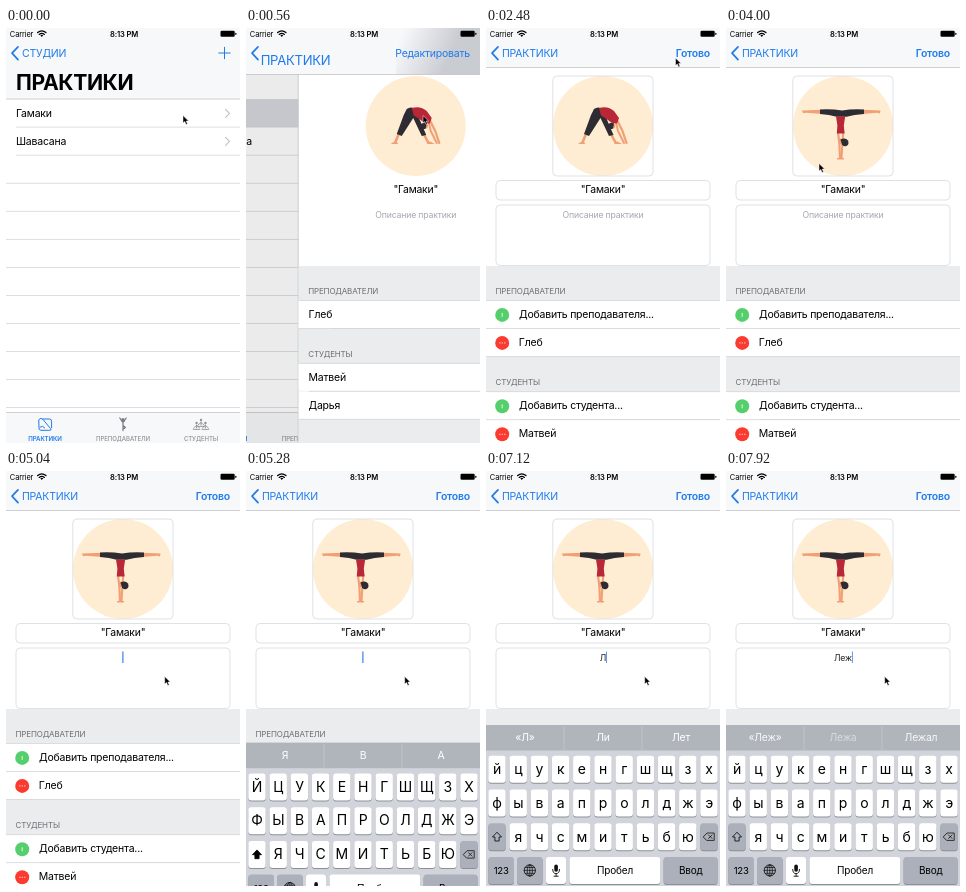
These frames come from a looping animation (234x415 px, 8000 ms). An HTML page:

```html
<!DOCTYPE html>
<html lang="ru">
<head>
<meta charset="utf-8">
<title>Практики</title>
<style>
html, body { margin: 0; width: 100%; height: 100%; overflow: hidden; background: #fff; }
svg { display: block; width: 100%; height: 100%; }
text { font-family: Inter, Roboto, "Open Sans", sans-serif; letter-spacing: -.02em; white-space: pre; }
</style>
</head>
<body>
<svg id="stage" viewBox="0 0 234 415"></svg>
<script>
const BLUE = '#1f7bea', GREY = '#929296', LINE = '#d0d1d4', SKIN = '#f0a074', DARK = '#2e2c33', RED = '#b92636';
const SOFT = '#abb0ba';

// Markup helpers
const text = (x, y, size, str, o = {}) =>
  `<text x="${x}" y="${y}" font-size="${size}" fill="${o.fill || '#000'}" font-weight="${o.weight || 400}"
    text-anchor="${o.anchor || 'start'}" ${o.id ? `id="${o.id}"` : ''} ${o.cls ? `class="${o.cls}"` : ''}>${str}</text>`;
const rect = (x, y, w, h, fill, extra = '') =>
  `<rect x="${x}" y="${y}" width="${w}" height="${h}" fill="${fill}" ${extra}/>`;
const path = (d, fill, extra = '') => `<path d="${d}" fill="${fill}" ${extra}/>`;
const stroke = (d, color, w, extra = '') =>
  `<path d="${d}" fill="none" stroke="${color}" stroke-width="${w}" stroke-linecap="round" stroke-linejoin="round" ${extra}/>`;
const line = (x, y, color = LINE) => rect(x, y - .3, 234 - x, .7, color);
const group = (id, body) => `<g id="${id}">${body}</g>`;
const mid = { anchor: 'middle' };

function listPage() {
  let s = rect(0, 0, 234, 415, '#fff') + rect(0, 71, 234, 28, '#d6d8de', 'id="pressed"');
  for (let i = 1; i < 12; i++) s += line(i < 3 ? 10 : 0, 71 + i * 28.05);
  ['Гамаки', 'Шавасана'].forEach((name, i) => {
    const y = 85.3 + i * 28;
    s += text(10, y + 3.8, 10.5, name) + stroke(`M219.6 ${y - 3.8}l3.9 3.9-3.9 3.9`, '#c4c4c9', 1.2);
  });
  return s + tabBar() + rect(0, 0, 234, 415, '#000', 'id="dim"');
}

function tabBar() {
  const tab = (x, name, fill, weight) => text(x, 412.6, 6.1, name, { anchor: 'middle', fill, weight });
  const sitter = (x, y) => `<circle cx="${x}" cy="${y}" r="1.2" fill="${GREY}"/>` +
    stroke(`M${x} ${y + 2}v3M${x - 3} ${y + 5}l3-2.6 3 2.6M${x - 3.3} ${y + 6.4}h6.6`, GREY, .9);
  return rect(0, 384.5, 234, 31, '#f7f8fa') + line(0, 384.6, '#bfbfc4') +
    stroke('M33 391.5q2-2.6 4 0l7.5 9q1.4 1.8-.6 1.8h-9q-2.4 0-2-2.8zM37 391h6.4q2.2 0 2.2 2.2v6.6M34 399q3-2 4.8 1', BLUE, 1) +
    '<circle cx="117" cy="391.6" r="1.5" fill="#77777c"/>' +
    stroke('M113.8 390l2.4 3.6h1.6l2.4-3.6M117 394v8.6M117 397.5l2.4 2-2.2 1.6', '#77777c', 1.2) +
    sitter(195, 392) + sitter(190.6, 395) + sitter(199.4, 395) +
    tab(39, 'ПРАКТИКИ', BLUE, 600) + tab(117, 'ПРЕПОДАВАТЕЛИ', GREY, 500) + tab(195, 'СТУДЕНТЫ', GREY, 500);
}

const bend = () =>
  stroke('M100 106l-3.5 8.5M125 106l4.5 8.5', SKIN, 2.6) +
  path('M92 116q2-2.5 5.500-2.500l2 2.500zM128 116q1-2.500 3.500-2.500l4.500 2.500z', SKIN) +
  path('M108 81q4-3 9 0l2 6 8.500 20-4.500 1-8.500-18-11.500 18-5-2 7-19z', DARK) +
  stroke('M131 92l5.500 11 4 12', SKIN, 2.300) + stroke('M130 94l2 9 6 12', SKIN, 2) +
  path('M113 80q9-2.500 15 3l5 7-2 5.500q-5 .5-9-3.500l-7-4.500z', RED) +
  '<circle cx="126.500" cy="98" r="2.800" fill="#f0a074"/>' +
  path('M121.500 97.500q2-4 6.500-2l-1 5q-4 2-5.500-3z', DARK);

const handstand = () =>
  path('M76 82.500l21-.8v4.300l-17-1.300-3 .5zM154.500 82.500l-18-.8v4.300l14.500-1.300 3 .8z', SKIN) +
  path('M94 81.400q12-.6 22 1 10-1.600 22-1v4.700q-10 .4-17.500 2.700h-10q-7-2.100-16.500-2.700z', DARK) +
  stroke('M112 104l1.400 12 .6 14', SKIN, 2.200) + stroke('M117.300 104l-1 13-.8 13', SKIN, 2.100) +
  path('M110 88.500h9.200l-1.400 9 .8 8h-7.800l.6-8z', RED) +
  path('M111 130h7.200l-.5 1.500h-6.700z', SKIN) +
  '<circle cx="115.600" cy="113.500" r="2.900" fill="#f0a074"/>' +
  path('M114.500 111.500q5-2.500 7.500 1 1.500 4-1.500 5.500-3.500 1-4.500-1.500z', DARK);

function row(y, name) {
  return rect(0, y, 234, 28, '#fff') + line(0, y) + line(0, y + 28) +
    `<g class="badge"><circle cx="16.200" cy="${y + 14.600}" r="7" fill="#fb3b30"/>` +
    stroke(`M13.500 ${y + 14.600}h.6M16 ${y + 14.600}h.6M18.500 ${y + 14.600}h.6`, '#ffd9d6', .9) + '</g>' +
    `<g class="inset">${text(9.800, y + 17.700, 10.5, name)}</g>`;
}

const addRow = (y, name) =>
  rect(0, y, 234, 28, '#fff') + line(0, y) + line(33, y + 28) +
  `<circle cx="16.200" cy="${y + 14.600}" r="7" fill="#55cf6b"/>` +
  stroke(`M16.200 ${y + 13}v3.200`, '#dff7e3', 1) + text(33, y + 17.700, 10.5, name);

function detailPage() {
  const head = (y, name) => text(9.500, y, 8, name, { fill: '#6d6d72' });
  const box = (x, y, w, h) => rect(x, y, w, h, 'none', 'rx="4" stroke="#d9dadd" stroke-width=".8"');
  return rect(-1, 39, 1, 376, '#c3c4c8') + rect(0, 39, 234, 376, '#fff') +
    '<circle cx="117" cy="98" r="50" fill="#ffedd3"/>' +
    group('poseA', bend()) + group('poseB', handstand()) +
    group('boxes', box(66.800, 48, 100.200, 100) + box(10, 152.500, 214, 19.500) + box(10, 177, 214, 60.500)) +
    text(117, 165, 10.400, '"Гамаки"', mid) +
    text(117, 190.200, 8.7, 'Описание практики', { id: 'hint', anchor: 'middle', fill: '#a6a7b0' }) +
    text(117, 190.200, 8.7, '', { id: 'typed', anchor: 'middle', fill: '#222' }) +
    rect(116.300, 180.500, 1.2, 11.5, '#3f7fe6', 'id="caret"') +
    rect(0, 238, 234, 177, '#ebeced') + head(266.200, 'ПРЕПОДАВАТЕЛИ') +
    addRow(272.300, 'Добавить преподавателя...') + group('teachers', row(272.300, 'Глеб')) +
    group('students', head(328.900, 'СТУДЕНТЫ') + addRow(335.200, 'Добавить студента...') +
      group('pupils', row(335.200, 'Матвей') + row(363.200, 'Дарья') + rect(0, 362.700, 10, 1, '#fff')));
}

function navBar() {
  return rect(0, 0, 234, 71, '#f7f8fa', 'id="bar"') +
    rect(150, 0, 84, 47, 'url(#shade)', 'id="haze"') +
    group('barLine', line(0, 0, '#bdbdc2')) +
    stroke('M12 18.800l-6 6.400 6 6.400', BLUE, 1.7) +
    text(16, 29, 10.5, 'СТУДИИ', { id: 'oldBack', fill: BLUE }) +
    stroke('M212.800 25h11.400M218.500 19.300v11.400', BLUE, 1, 'id="plus"') +
    text(10, 62, 21.200, 'ПРАКТИКИ', { id: 'title', weight: 700 }) +
    text(16, 29, 10.5, 'ПРАКТИКИ', { id: 'back', fill: BLUE }) +
    text(224, 29, 10.5, 'Редактировать', { id: 'edit', anchor: 'end', fill: BLUE }) +
    text(224, 29, 10.5, 'Готово', { id: 'done', anchor: 'end', fill: BLUE, weight: 600 });
}

function keyboard() {
  const key = (x, y, w, fill = '#fff', extra = '') =>
    rect(x, y + 1, w, 27, '#8d9096', 'rx="3"') + rect(x, y, w, 27, fill, `rx="3" ${extra}`);
  const col = i => 11 + 21.200 * i, top = r => 284.800 + 33.700 * r;
  let s = rect(0, 254, 234, 162, '#d1d4da') + rect(0, 254, 234, 25.500, '#b0b4bb') +
    rect(77.600, 255, .8, 24, '#c6c9ce') + rect(155.600, 255, .8, 24, '#c6c9ce');
  for (let i = 0; i < 3; i++)
    s += text(39 + 78 * i, 270.200, 10.4, '', { id: 'word' + i, anchor: 'middle', fill: '#fff' });
  ['йцукенгшщзх', 'фывапролджэ', 'ячсмитьбю'].forEach((chars, r) => [...chars].forEach((c, i) => {
    const x = col(i + (r === 2));
    s += key(x - 8.700, top(r), 17.400) + text(x, top(r) + 18.300, 14, c, { anchor: 'middle', cls: 'letter' });
  }));
  const y3 = top(2), y4 = top(3), cy = y4 + 13.500;
  s += key(2.300, y3, 17.400, '#fff', 'id="shiftKey"') +
    path(`M11 ${y3 + 9}l4.500 4.800h-2.400v4h-4.200v-4h-2.400z`, '#000', 'id="shift" stroke="#000" stroke-width=".8" stroke-linejoin="round"') +
    key(col(10) - 8.700, y3, 17.400, SOFT) +
    stroke(`M217.500 ${y3 + 13.500}l3.500-3.700h7.200v7.400h-7.200zM222.600 ${y3 + 11.800}l3.400 3.400m0-3.400l-3.400 3.400`, '#222', .9) +
    key(2.300, y4, 25.700, SOFT) + text(15.200, cy + 3.500, 9.6, '123', mid) +
    key(31, y4, 25.700, SOFT) +
    `<circle cx="43.800" cy="${cy}" r="5.600" fill="none" stroke="#111" stroke-width=".9"/>` +
    `<ellipse cx="43.800" cy="${cy}" rx="2.600" ry="5.600" fill="none" stroke="#111" stroke-width=".8"/>` +
    stroke(`M38.200 ${cy}h11.200M39.200 ${cy - 2.900}h9.200M39.200 ${cy + 2.900}h9.200M43.800 ${cy - 5.600}v11.200`, '#111', .7) +
    key(60, y4, 20) + rect(68.300, cy - 6, 3.600, 7.400, '#111', 'rx="1.800"') +
    stroke(`M66.700 ${cy - 1}q0 4.200 3.400 4.200t3.400-4.200M70.100 ${cy + 3.200}v2.600M68 ${cy + 5.800}h4.200`, '#111', .9) +
    key(83.500, y4, 90.700) + text(129, cy + 3.500, 10, 'Пробел', mid) +
    key(177.600, y4, 54, SOFT) + text(204.800, cy + 3.500, 10, 'Ввод', mid);
  return s;
}

const statusBar = () =>
  text(3.800, 8.500, 7.5, 'Carrier') +
  stroke('M31.600 4.600q4.200-3.400 8.400 0M33.200 6.400q2.600-2 5.200 0', '#000', 1.3) +
  path('M35.800 9l-1.500-1.700q1.500-1 3 0z', '#000') +
  text(118, 8.500, 7.6, '8:13 PM', { anchor: 'middle', weight: 600 }) +
  rect(214.500, 2.800, 14.200, 6, '#000', 'rx="1.300"') + rect(229.300, 4.800, 1, 2.200, '#000', 'rx=".4"');

const stage = document.getElementById('stage');
stage.innerHTML =
  `<defs><linearGradient id="shade" x2="1" y2=".25"><stop offset=".1" stop-color="#a9adb5" stop-opacity="0"/>
    <stop offset=".75" stop-color="#a9adb5" stop-opacity=".85"/></linearGradient></defs>` +
  group('list', listPage()) + group('detail', detailPage()) + group('nav', navBar()) +
  group('keys', keyboard()) + statusBar() +
  group('pointer', path('M0 0v7.600l1.800-1.600 1.300 3 1.400-.6-1.300-2.900h2.400z', '#000', 'stroke="#fff" stroke-width=".5"'));

// Motion
const $ = id => document.getElementById(id);
const letters = [...document.querySelectorAll('.letter')];
const badges = document.querySelectorAll('.badge'), insets = document.querySelectorAll('.inset');
const clamp = v => Math.max(0, Math.min(1, v));
const span = (t, from, len) => clamp((t - from) / len);
const out = u => 1 - Math.pow(1 - u, 2.4);
const inOut = u => u * u * (3 - 2 * u);
const mix = (a, b, p) => a + (b - a) * p;
const move = (el, x, y) => el.setAttribute('transform', `translate(${x} ${y})`);
const fade = (id, v) => $(id).setAttribute('opacity', clamp(v));
const set = (id, attrs) => { for (const k in attrs) $(id).setAttribute(k, attrs[k]); };

// time, x, y
const route = [[0, 177, 87.5], [1040, 177, 87.5], [1600, 189.5, 30], [2720, 189.5, 30], [3440, 93, 135.5],
  [4080, 93, 135.5], [4560, 158.7, 205.5], [8000, 158.7, 205.5]];
// time, typed text, suggestions
const typing = [[0, '', ['Я', 'В', 'А']], [6640, 'Л', ['«Л»', 'Ли', 'Лет']],
  [7200, 'Ле', ['«Ле»', 'Лет', 'Лето']], [7840, 'Леж', ['«Леж»', 'Лежа', 'Лежал']]];
const FOCUS = 5040;

function render(t) {
  const push = out(span(t, 320, 520)), edit = inOut(span(t, 1920, 320)), rise = out(span(t, FOCUS, 400));

  move($('list'), -70 * push, 0);
  move($('detail'), 235 * (1 - push), 0);
  fade('dim', .1 * push);
  fade('pressed', t >= 240 ? 1 : 0);

  const barH = mix(71, 39.3, push);
  set('bar', { height: barH });
  set('haze', { height: barH, opacity: push < 1 ? clamp(4 * push * (1 - push)) : 0 });
  move($('barLine'), 0, barH);
  fade('oldBack', 1 - push * 2);
  move($('oldBack'), -40 * push, 0);
  fade('plus', 1 - push * 2);
  set('title', { x: mix(10, 16, push), y: mix(62, 29, push), 'font-size': mix(21.2, 10.5, push) });
  set('back', { x: mix(10, 16, push), y: mix(66, 29, push), 'font-size': mix(22, 10.5, push) });
  fade('title', 1 - push * 1.6);
  fade('back', push * 1.6 - .2);
  const held = t >= 1680;
  set('edit', { fill: held ? '#c9ccd1' : BLUE });
  fade('edit', held ? 1 - edit : push * 1.3);
  fade('done', edit);

  fade('boxes', edit);
  move($('teachers'), 0, 28 * edit);
  move($('students'), 0, 28.5 * edit);
  move($('pupils'), 0, 28 * edit);
  badges.forEach(b => b.setAttribute('opacity', edit));
  insets.forEach(g => move(g, 23 * edit, 0));
  fade('poseA', t < 3680 ? 1 : 0);
  fade('poseB', t < 3680 ? 0 : 1);

  const [since, word, hints] = typing.filter(s => s[0] <= t).pop();
  fade('hint', t < FOCUS ? 1 : 0);
  $('typed').textContent = word;
  const blinkFrom = word ? since : FOCUS;
  fade('caret', t >= FOCUS && (t - blinkFrom) % 1040 < 520 ? 1 : 0);
  const half = word ? $('typed').getComputedTextLength() / 2 : -.7;
  set('caret', { x: 117 + half, width: word ? .8 : 1.2 });

  move($('keys'), 0, 162 * (1 - rise));
  hints.forEach((h, i) => {
    $('word' + i).textContent = h;
    fade('word' + i, word ? (t - since) / (i === 1 ? 160 : 90) : 1);
  });
  letters.forEach(el => {
    el.textContent = word ? el.textContent.toLowerCase() : el.textContent.toUpperCase();
  });
  set('shiftKey', { fill: word ? SOFT : '#fff' });
  set('shift', { fill: word ? 'none' : '#000' });

  const k = Math.max(1, route.findIndex(p => p[0] > t)), a = route[k - 1], b = route[k];
  const u = inOut(span(t, a[0], b[0] - a[0]));
  move($('pointer'), mix(a[1], b[1], u), mix(a[2], b[2], u));
}

const start = performance.now();
function tick() {
  render((performance.now() - start) % 8000);
  requestAnimationFrame(tick);
}
render(0);
requestAnimationFrame(tick);
</script>
</body>
</html>
```
